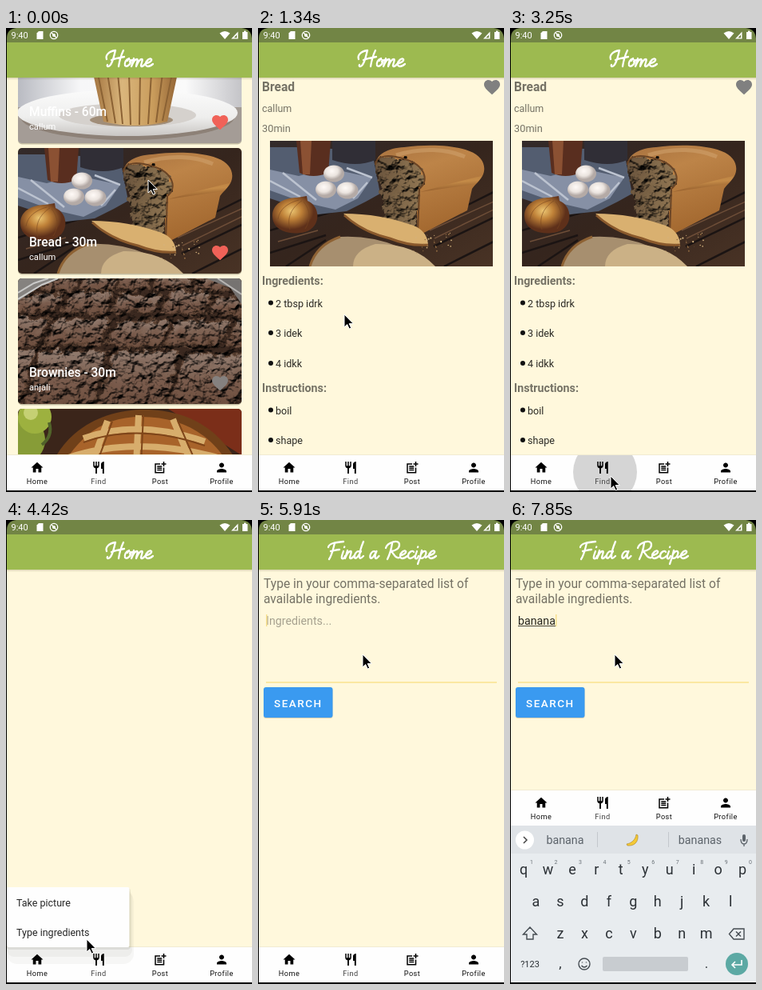
An HTML page for the animation above (8 s loop, 308 by 580 pixels).

```html
<!DOCTYPE html>
<html lang="en">
<head>
<meta charset="utf-8">
<title>Recipe app</title>
<style>
html, body { margin: 0; width: 100%; height: 100%; overflow: hidden; background: #fff8dc; }
svg { display: block; width: 308px; height: 580px; font-family: Roboto, "Open Sans", sans-serif; }
</style>
</head>
<body>
<svg id="stage" viewBox="0 0 308 580" xmlns="http://www.w3.org/2000/svg">
<defs>
  <clipPath id="card"><rect width="280" height="157" rx="5"/></clipPath>
  <clipPath id="photo"><rect width="279" height="157"/></clipPath>
  <clipPath id="body"><rect x="1" y="62" width="307" height="472"/></clipPath>
  <clipPath id="bar"><rect x="1" y="534" width="307" height="44"/></clipPath>
  <filter id="rough" x="0" y="0" width="1" height="1" color-interpolation-filters="sRGB">
    <feTurbulence type="fractalNoise" baseFrequency=".09" numOctaves="4" seed="4" result="noise"/>
    <feDisplacementMap in="SourceGraphic" in2="noise" scale="16" xChannelSelector="R" yChannelSelector="G" result="bent"/>
    <feDiffuseLighting in="noise" surfaceScale="7" diffuseConstant="1.25" lighting-color="#fff" result="light"><feDistantLight azimuth="250" elevation="52"/></feDiffuseLighting>
    <feComposite in="bent" in2="light" operator="arithmetic" k1="1.050"/>
  </filter>
  <linearGradient id="drop" x2="0" y2="1"><stop stop-color="#5a5220" stop-opacity=".22"/><stop offset="1" stop-color="#5a5220" stop-opacity="0"/></linearGradient>
  <linearGradient id="wood" x2="1" y2="1"><stop stop-color="#332a2a"/><stop offset=".5" stop-color="#35251d"/><stop offset="1" stop-color="#493325"/></linearGradient>
  <linearGradient id="crust" x2=".4" y2="1"><stop stop-color="#a97340"/><stop offset=".35" stop-color="#bd8448"/><stop offset="1" stop-color="#a3682f"/></linearGradient>
  <linearGradient id="side" x2=".3" y2="1"><stop stop-color="#b67c3e"/><stop offset=".5" stop-color="#c48b48"/><stop offset="1" stop-color="#8c5628"/></linearGradient>
  <linearGradient id="crumb" x2="1" y2="0"><stop stop-color="#65503a"/><stop offset="1" stop-color="#8c7350"/></linearGradient>
  <radialGradient id="onionFill" cx=".42" cy=".4"><stop stop-color="#ecc673"/><stop offset=".45" stop-color="#bf8138"/><stop offset="1" stop-color="#5e301a"/></radialGradient>
  <radialGradient id="eggFill" cx=".4" cy=".35"><stop stop-color="#fffaf7"/><stop offset=".6" stop-color="#ebe4df"/><stop offset="1" stop-color="#b4aaa6"/></radialGradient>
  <linearGradient id="haze"><stop stop-color="#b9bbc2"/><stop offset=".28" stop-color="#f7f7f8"/><stop offset=".75" stop-color="#fafafa"/><stop offset="1" stop-color="#c4c4c8"/></linearGradient>
  <linearGradient id="dish" x2="0" y2="1"><stop stop-color="#fbfbfb"/><stop offset=".6" stop-color="#eeeeed"/><stop offset="1" stop-color="#c9c6c3"/></linearGradient>
  <linearGradient id="liner"><stop stop-color="#a0703c"/><stop offset=".35" stop-color="#dab67c"/><stop offset=".7" stop-color="#c99c5c"/><stop offset="1" stop-color="#8f6032"/></linearGradient>
  <linearGradient id="bake" x2="0" y2="1"><stop stop-color="#8b766a"/><stop offset=".5" stop-color="#75594a"/><stop offset="1" stop-color="#684a3b"/></linearGradient>

  <g id="bread">
    <rect width="280" height="157" fill="url(#wood)"/>
    <path d="M0 112 100 82M0 140 70 118M205 132 280 96M218 157 280 126M20 157 70 124M248 80 280 64" stroke="#1b1413" stroke-width="2.500" fill="none"/>
    <path d="M206 122 280 86M200 112 280 76M10 126 60 112" stroke="#6e4e38" stroke-width="1.500" fill="none"/>
    <path d="M0 8 36 8 78 10 128 14 138 66 120 76 96 88 60 92 0 72Z" fill="#535d70"/>
    <path d="M0 36 36 44 72 34 128 46 110 72 82 86 56 80 28 72 0 62Z" fill="#8690a5"/>
    <path d="M0 50 38 70M16 40 58 74M96 34 128 46M104 72 122 52" stroke="#bcc3d0" stroke-width="2.500"/>
    <path d="M78 0H132V24Q108 34 78 24Z" fill="#302e36"/>
    <path d="M33 0H76L73 40Q54 48 37 40Z" fill="#592e1f"/>
    <path d="M38 0H52L50 42H41Z" fill="#8b5133"/>
    <g fill="url(#eggFill)"><ellipse cx="80" cy="41" rx="13" ry="10.500"/><ellipse cx="70" cy="61" rx="13" ry="10.500"/><ellipse cx="97" cy="62" rx="13.500" ry="10.500"/></g>
    <path d="M3 94C3 76 22 71 34 71L46 69 47 75C64 82 64 108 44 114 22 119 3 111 3 94Z" fill="url(#onionFill)"/>
    <path d="M10 98C12 85 22 78 36 74M25 111C21 97 26 84 40 75M44 110C52 98 50 86 42 76" stroke="#794620" opacity=".6" fill="none"/>
    <path d="M132 30C133 17 147 9 168 8 198 4 230 5 250 13 266 19 272 32 266 44 262 51 257 54 253 60L247 87 185 119 183 58Z" fill="url(#crust)"/>
    <path d="M188 64Q238 50 265 44 262 51 257 54 253 60L247 87 185 119Z" fill="url(#side)"/>
    <path d="M158 18C190 8 222 10 244 20" stroke="#cfa06b" stroke-width="5" opacity=".6" fill="none"/>
    <path d="M132 30C133 17 150 17 169 23 194 30 200 50 187 60L185 117 142 98 141 61Q132 48 132 30Z" fill="url(#crumb)" filter="url(#rough)"/>
    <path d="M132 30C133 17 150 17 169 23 194 30 200 50 187 60L185 117" fill="none" stroke="#6b4526" stroke-width="2"/>
    <path d="M92 91Q138 91 180 106 197 113 198 130 174 133 146 121 112 112 92 91Z" fill="#d9b070"/>
    <path d="M93 93Q116 114 150 122 175 132 198 130" stroke="#8a592c" stroke-width="3" fill="none"/>
    <path d="M50 157Q58 130 88 120 126 118 160 132L196 157Z" fill="#a78f6f"/>
    <path d="M104 157Q104 137 132 129 180 128 207 157Z" fill="#cbb186"/>
    <path d="M50 157Q58 130 88 120" stroke="#8e6234" stroke-width="3" fill="none"/>
    <g id="crumbs"/>
  </g>

  <g id="muffin">
    <rect width="280" height="157" fill="url(#haze)"/>
    <path d="M0 112H280V157H0Z" fill="#a49c96"/>
    <ellipse cx="137" cy="124" rx="134" ry="29" fill="#8d8177"/>
    <ellipse cx="137" cy="119" rx="138" ry="29" fill="url(#dish)"/>
    <ellipse cx="137" cy="122" rx="86" ry="15" fill="#d5d1cd"/>
    <ellipse cx="142" cy="128" rx="52" ry="8" fill="#a18e79"/>
    <path d="M92 60H202L187 130Q146 140 107 130Z" fill="url(#liner)"/>
    <path d="M100 70 112 130M112 70 122 132M125 70 131 133M139 70 141 134M153 70 152 134M167 70 163 133M181 70 173 131M193 70 181 129" stroke="#8b6234" stroke-width="2"/>
  </g>

  <g id="brownies"><rect width="280" height="157" fill="#302119"/><g filter="url(#rough)"><rect x="-10" y="-10" width="300" height="177" fill="#38271e"/><g id="pieces"/></g>
    <path d="M0 0H52L28 10 0 28Z" fill="#85827f"/><path d="M0 18 20 6 38 0M0 26 30 8 50 0" stroke="#c9c9c8" stroke-width="2" fill="none"/>
    <path d="M236 0H280V32L266 12Z" fill="#767371"/><path d="M250 0 280 20" stroke="#b7b5b3" stroke-width="2"/>
  </g>

  <g id="pie">
    <rect width="280" height="157" fill="#3b251a"/>
    <path d="M188 0H280V58Z" fill="#7b2e19"/>
    <circle cx="4" cy="39" r="30" fill="#879c37"/><circle cx="21" cy="10" r="21" fill="#9db13f"/><circle cx="16" cy="5" r="9" fill="#c5d073"/><path d="M30 45Q44 34 39 17" stroke="#51632a" stroke-width="4" fill="none"/>
    <path d="M42 70C62 26 104 3 154 1 212 0 250 25 273 64V157H42Z" fill="#704019"/>
    <path d="M56 70C82 28 112 10 154 10 204 10 240 30 264 70Z" fill="#a8632a"/>
    <g stroke="#d7ad6c" stroke-width="8" fill="none"><path d="M82 37Q150 12 234 41M60 62Q150 31 260 64M112 15 92 70M151 8 148 70M194 13 218 70"/></g>
    <g stroke="#7e4519" stroke-width="2" fill="none"><path d="M82 42Q150 17 234 46M118 16 98 70M157 8 154 70M200 15 224 70"/></g>
  </g>

  <path id="heart" d="M12 21.35l-1.45-1.32C5.4 15.36 2 12.28 2 8.5 2 5.42 4.42 3 7.5 3c1.74 0 3.41.81 4.5 2.09C13.09 3.81 14.76 3 16.5 3 19.58 3 22 5.42 22 8.5c0 3.78-3.4 6.86-8.55 11.54z"/>
</defs>

<rect width="308" height="580" fill="#fff8dc"/>
<g id="list" clip-path="url(#body)"></g>
<g id="detail" clip-path="url(#body)" fill="#757265">
  <text x="5" y="79" font-size="15.6" font-weight="700">Bread</text>
  <text x="5" y="105" font-size="12.5">callum</text>
  <text x="5" y="129.500" font-size="12.8">30min</text>
  <use href="#heart" x="281" y="62" fill="#808080"/>
  <g id="detailPhoto" transform="translate(15 141)" clip-path="url(#photo)"><use href="#bread"/></g>
  <g id="steps"></g>
  <path id="glow" d="M1 534Q154 430 308 534Z" fill="#9dbb50"/>
</g>
<g id="find">
  <g font-size="15.6" fill="#757265"><text x="7" y="85">Type in your comma-separated list of</text><text x="7" y="103.500">available ingredients.</text></g>
  <text id="hint" x="10" y="130.500" font-size="14.25" fill="#a6a18f">Ingredients...</text>
  <text id="typed" x="10" y="130.500" font-size="14.25" fill="#26251f"></text>
  <rect id="wordLine" x="10" y="132" height="1" fill="#45433a"/>
  <rect id="caret" y="118" width="1.500" height="15" fill="#f8df8c"/>
  <rect id="fieldLine" x="10" width="289"/>
  <rect x="7" y="210" width="86.500" height="38" rx="3" fill="#8a8568" opacity=".35"/>
  <rect x="7" y="209" width="86.500" height="38" rx="3" fill="#3a9af0"/>
  <text x="20" y="234" font-size="13.5" font-weight="500" letter-spacing="1.5" fill="#fff">SEARCH</text>
</g>

<rect y="62" width="308" height="3" fill="url(#drop)"/>
<rect width="308" height="18" fill="#728545"/>
<rect y="18" width="308" height="44" fill="#9dba50"/>
<g id="titleHome" role="img" aria-label="Home"></g>
<g id="titleFind" role="img" aria-label="Find a Recipe"></g>
<g fill="#fff">
  <text x="6.500" y="13" font-size="11">9:40</text>
  <path d="M41 4H46.500V14H38.500V6.500Z"/>
  <circle cx="60" cy="9" r="4.700" fill="none" stroke="#fff" stroke-width="1.300"/><circle cx="60" cy="9" r="2"/><path d="M57 6 63 12" stroke="#fff" stroke-width="1.200"/>
  <path d="M267.500 6.500Q274 1.500 280.500 6.500L274 14Z"/>
  <path d="M290.500 4.500V13.500H282ZM289 8.500 285.500 12.300H289Z" fill-rule="evenodd"/>
  <path d="M298 3.500H300.500V5H302.500V14H296V5H298Z"/>
</g>

<rect id="blank" x="1" y="338" width="307" height="240" fill="#fefefe"/>
<g id="nav"></g>
<g id="popup">
  <g fill="#4a4636"><rect x="1" y="464" width="159" height="91" rx="13" opacity=".045"/><rect x="1" y="462" width="157" height="84" rx="9" opacity=".055"/><rect x="1" y="460" width="155" height="77" rx="4" opacity=".1"/></g>
  <rect x="1" y="459" width="153.500" height="75" rx="2" fill="#fefefe"/>
  <rect id="press" x="1" y="497" width="153.500" height="37" fill="#e2e2e2"/>
  <g font-size="12.5" fill="#272727"><text x="13" y="482.500">Take picture</text><text x="13" y="520">Type ingredients</text></g>
</g>
<g id="keyboard"></g>
<path d="M0 0H13Q1 1 1 13V578H308V580H0ZM295 0H308V13Q307 1 295 0Z" fill="#000"/>
<path id="pointer" d="M0 0V16L3.700 12.600 6.200 18 8.700 17 6.200 11.600H11.300Z" fill="#000" stroke="#fff"/>
</svg>

<script>
const $ = id => document.getElementById(id);
const show = (id, on) => $(id).setAttribute('display', on ? 'inline' : 'none');
const set = (id, attrs) => { for (const k in attrs) $(id).setAttribute(k, attrs[k]); };
const text = (s, x, y, size, extra = '') => `<text x="${x}" y="${y}" font-size="${size}" ${extra}>${s}</text>`;

let seed = 7;
const rnd = () => (seed = seed * 16807 % 2147483647) / 2147483647;
const specks = (n, x, y, w, h, colors, size) => Array.from({ length: n }, (_, i) =>
  `<circle cx="${(x + rnd() * w).toFixed(1)}" cy="${(y + rnd() * h).toFixed(1)}" r="${(size * (.4 + rnd())).toFixed(1)}" fill="${colors[i % colors.length]}"/>`).join('');

$('crumbs').innerHTML = specks(30, 180, 114, 50, 26, ['#d3b27e', '#8d6841'], .8);

// Brownie squares on a skewed grid that grows towards the viewer
function browniePieces() {
  const rowY = [-4, 20, 50, 92, 168];
  const jit = () => (rnd() - .5) * 6;
  let out = '';
  for (let r = 0; r < 4; r++) for (let c = -1; c < 7; c++) {
    const w = 48 + r * 14, x = 150 + (c - 2.6) * w, lean = 4 + r * 5, top = rowY[r] + jit(), low = rowY[r + 1] - 6 - r;
    out += `<path d="M${x + lean + 5 + jit()} ${top}L${x + w + lean - 3} ${top + jit()} ${x + w - 4} ${low + jit()} ${x + 3} ${low}Z" fill="url(#bake)" stroke="#5a4132" stroke-width="2" stroke-linejoin="round"/>`;
  }
  return out;
}
$('pieces').innerHTML = browniePieces();

const cards = [
  ['muffin', 'Muffins - 60m', 'callum', -13, '#f06258'],
  ['bread', 'Bread - 30m', 'callum', 150, '#f06258'],
  ['brownies', 'Brownies - 30m', 'anjali', 313, '#85817f'],
  ['pie', '', '', 476, 'none']
];
$('list').innerHTML = cards.map(([pic, name, by, y, color]) =>
  `<rect x="15" y="${y + 1.5}" width="280" height="157" rx="5" fill="#8d886f" opacity=".5"/>
   <g transform="translate(15 ${y})" clip-path="url(#card)"><use href="#${pic}"/></g>
   <g fill="#fff">${text(name, 29, y + 123, 15.6, 'font-weight="500"')}${text(by, 29, y + 140, 11.2)}</g>
   <use href="#heart" x="256" y="${y + 119}" fill="${color}"/>`).join('');

const bullet = (s, y) => `<circle cx="16" cy="${y - 5}" r="3" fill="#111"/>` + text(s, 22, y, 12.6, 'fill="#2b2a25"');
const heading = (s, y) => text(s, 5, y, 14.25, 'font-weight="700"');
$('steps').innerHTML = heading('Ingredients:', 321) + bullet('2 tbsp idrk', 348.5) + bullet('3 idek', 386) + bullet('4 idkk', 424)
  + heading('Instructions:', 455) + bullet('boil', 482.5) + bullet('shape', 520);

// Brush lettering: stroke path and advance per glyph
const glyphs = {
  H: ['M1-9C-1-14 4-19 12-20 10-13 9-5 5-1 3 1 1 0 2-2M22-20C19-14 17-6 16 0M7-8C12-10 17-11 23-12', 23],
  F: ['M9-19C7-12 6-5 2 1M1-14C2-19 10-20 20-21M4-9C9-10 12-11 15-11', 17],
  R: ['M8-19C7-12 5-5 2 1M0-13C2-20 17-25 17-17 17-12 11-9 6-9 10-8 11 1 17-1', 17],
  o: ['M6-10C2-9 0-4 1-1 3 1 8-2 8-6 8-9 5-10 4-7M7-6 10-8', 9],
  m: ['M3-10 0 0C2-5 5-9 7-9 9-9 6-3 6 0 8-5 11-9 13-9 15-9 12-3 12-1 12 1 15 0 17-3', 17],
  n: ['M3-10 0 0C2-5 5-9 7-9 9-9 6-3 6-1 6 1 9 0 11-3', 11],
  e: ['M1-4C5-4 9-7 8-9 6-11 1-7 1-3 1 1 5 1 10-3', 10],
  c: ['M8-8C7-11 1-8 1-3 1 1 5 1 9-3', 9],
  i: ['M3-9C2-6 0-2 1 0 2 1 4 0 5-3M4-14 4.300-14.500', 5],
  d: ['M8-8C4-11 0-5 1-1 3 2 7-5 9-9M12-21C9-14 7-6 7-2 7 1 9 0 12-3', 12],
  a: ['M8-8C4-11 0-5 1-1 3 2 7-5 9-9 7-5 6 1 9 0L12-3', 13],
  p: ['M4-10C3-4 1 2-1 7M3-5C6-11 11-10 9-5 8-1 4 1 2-1M9-1 12-3', 12],
  ' ': ['', 7.5]
};
function lettering(word, x) {
  return [...word].map(ch => {
    const [d, adv] = glyphs[ch], part = `<path d="${d}" transform="translate(${x} 48)"/>`;
    x += adv;
    return part;
  }).join('');
}
$('titleHome').innerHTML = lettering('Home', 125);
$('titleFind').innerHTML = lettering('Find a Recipe', 87);
for (const id of ['titleHome', 'titleFind'])
  set(id, { fill: 'none', stroke: '#fff', 'stroke-width': 2.3, 'stroke-linecap': 'round', 'stroke-linejoin': 'round' });

const tabs = [
  ['Home', 'M10 20v-6h4v6h5v-8h3L12 3 2 12h3v8z'],
  ['Find', 'M11 9H9V2H7v7H5V2H3v7c0 2.120 1.660 3.840 3.750 3.970V22h2.500v-9.030C11.340 12.840 13 11.120 13 9V2h-2zm5-3v8h2.500v8H21V2c-2.760 0-5 2.240-5 4z'],
  ['Post', 'M17 19.200H5V7h7V5H3v16.200h16V12h-2zM19 2h-2v3h-3v2h3v3h2V7h3V5h-3zM7 9h8v2H7zM7 12h8v2H7zM7 15h8v2H7z'],
  ['Profile', 'M12 12c2.210 0 4-1.790 4-4s-1.790-4-4-4-4 1.790-4 4 1.790 4 4 4zm0 2c-2.670 0-8 1.340-8 4v2h16v-2c0-2.660-5.330-4-8-4z']
];
$('nav').innerHTML = `<rect x="1" y="533" width="307" height="1" fill="#f1ebd2"/><rect x="1" y="534" width="307" height="44" fill="#fefefe"/>
  <g clip-path="url(#bar)"><circle id="ripple" cx="119" cy="555" fill="#d5d5d5"/></g>`
  + tabs.map(([name, d], i) => {
    const x = 39 + 77 * i;
    return `<path d="${d}" transform="translate(${x - 9} 540.500) scale(.75)"/>`
      + text(name, x, 570, 9.2, `letter-spacing=".45" text-anchor="middle" fill="${i == 1 ? '#444' : '#111'}"`);
  }).join('');

const mid = 'text-anchor="middle"';
const keyRow = (chars, x, y) => [...chars].map((c, i) => text(c, x + 30.45 * i, y, 18, mid)).join('');
$('keyboard').innerHTML = `<rect x="1" y="382" width="307" height="196" fill="#e8ecef"/><rect x="1" y="382" width="307" height="35" fill="#dfe3e7"/>
  <circle cx="18.500" cy="400" r="11.500" fill="#fff"/><path d="M17 396 21 400 17 404" fill="none" stroke="#444" stroke-width="1.500"/>
  <g id="words" fill="#5c636a"><path d="M109.500 390V409M198.500 390V409" stroke="#c3c8cd"/>
    ${text('', 69, 405, 14.25, mid + ' id="left"')}${text('', 154, 405, 14.25, mid + ' id="center"')}${text('', 238, 405, 14.25, mid + ' id="right"')}
    <path id="banana" d="M158 393 160 394C161 402 156 408 147 407L146 405C152 404 157 400 158 393Z" fill="#f4c935" stroke="#a98126" stroke-width=".6"/></g>
  <g fill="none" stroke="#5c636a" stroke-width="1.300"><path d="M289 399Q289 405 293 405T297 399M293 405V408"/></g><rect x="291" y="393" width="4" height="9" rx="2" fill="#5c636a"/>
  <g fill="#2b3035">${keyRow('qwertyuiop', 17, 443)}${keyRow('asdfghjkl', 32.5, 483)}${keyRow('zxcvbnm', 63, 523)}
    ${[...'1234567890'].map((c, i) => text(c, 27 + 30.45 * i, 430, 7, mid + ' fill="#6b7278"')).join('')}
    ${text('?123', 25, 559, 11, mid)}${text(',', 63, 560, 17, mid)}${text('.', 246, 560, 17, mid)}</g>
  <g fill="none" stroke="#454c52" stroke-width="1.400"><path d="M25 509 16.500 518H21V524H29V518H33.500ZM280 511H293V524H280L274.500 517.500ZM283 514.500 289 520.500M289 514.500 283 520.500"/>
    <circle cx="93" cy="555" r="7"/><path d="M89.500 557Q93 561 96.500 557M90.500 552.500V553.500M95.500 552.500V553.500"/></g>
  <rect x="116" y="546" width="107" height="18" rx="2" fill="#c8ccd0"/>
  <circle cx="284" cy="555" r="14" fill="#5ca9a4"/><path d="M290 550V556H278M282 552 278 556 282 560" fill="none" stroke="#fff" stroke-width="1.600"/>`;

// Last row whose start time has passed
const at = (rows, t) => rows.reduce((hit, row) => row[0] <= t ? row : hit);

const pointerPath = [
  [0, 178, 190], [150, 171, 219], [1340, 108, 358], [1490, 108, 340], [1640, 109, 318], [1780, 110, 304], [1930, 111, 310],
  [2080, 117, 344], [2230, 126, 388], [2370, 133, 428], [2520, 130, 480], [2660, 127, 530], [2810, 126, 560],
  [3840, 122, 556], [3990, 114, 546], [4130, 106, 534], [4280, 101, 524], [5020, 106, 478], [5170, 115, 401],
  [5310, 124, 274], [5460, 131, 168]
];
const glowSteps = [[0, 0], [1490, .1], [1640, .2], [1780, .26], [1930, .2], [2080, .12], [2230, .05], [2370, 0]];
const rippleSteps = [[0, 0, 0], [3250, 40, 1], [3400, 44, .8], [3540, 46, .45], [3690, 46, .15], [3840, 0, 0]];
const popupSteps = [[0, 0], [3540, .5], [3690, 1], [5170, .9], [5310, 0]];

function draw(t) {
  const finding = t >= 5020, keys = t >= 6510, focused = t >= 5910;
  show('list', t < 740);
  show('detail', t >= 740 && t < 3540);
  show('detailPhoto', t >= 890);
  show('find', finding);
  show('titleHome', !finding);
  show('titleFind', finding);
  set('glow', { opacity: at(glowSteps, t)[1] });

  const [, r, alpha] = at(rippleSteps, t);
  set('ripple', { r, opacity: alpha });
  const fade = at(popupSteps, t)[1];
  show('popup', fade > 0);
  set('popup', { opacity: fade });
  show('press', t >= 4870 && t < 5170);

  show('blank', keys);
  show('keyboard', t >= 6660);
  set('nav', { transform: `translate(0 ${keys ? -196 : 0})` });

  const count = Math.max(0, Math.min(6, Math.floor((t - 6950) / 150) + 1));
  const word = 'banana'.slice(0, count), done = t >= 7850;
  $('typed').textContent = word;
  show('hint', !count);
  const width = count ? $('typed').getComputedTextLength() : 0;
  set('wordLine', { width });
  set('caret', { x: 10 + width });
  show('caret', count > 0 || focused && (t - 5910) % 1000 < 500);
  set('fieldLine', focused ? { y: 202, height: 2, fill: '#fbe8a2' } : { y: 202, height: 1, fill: '#8e8a79' });

  show('words', count > 0);
  $('left').textContent = word;
  $('center').textContent = count > 2 && !done ? 'banana' : '';
  $('right').textContent = count > 2 ? 'bananas' : '';
  show('banana', done);

  const [, x, y] = at(pointerPath, t);
  set('pointer', { transform: `translate(${x} ${y})` });
}

const start = performance.now();
function tick() {
  draw((performance.now() - start) % 8000);
  requestAnimationFrame(tick);
}
tick();
</script>
</body>
</html>
```
